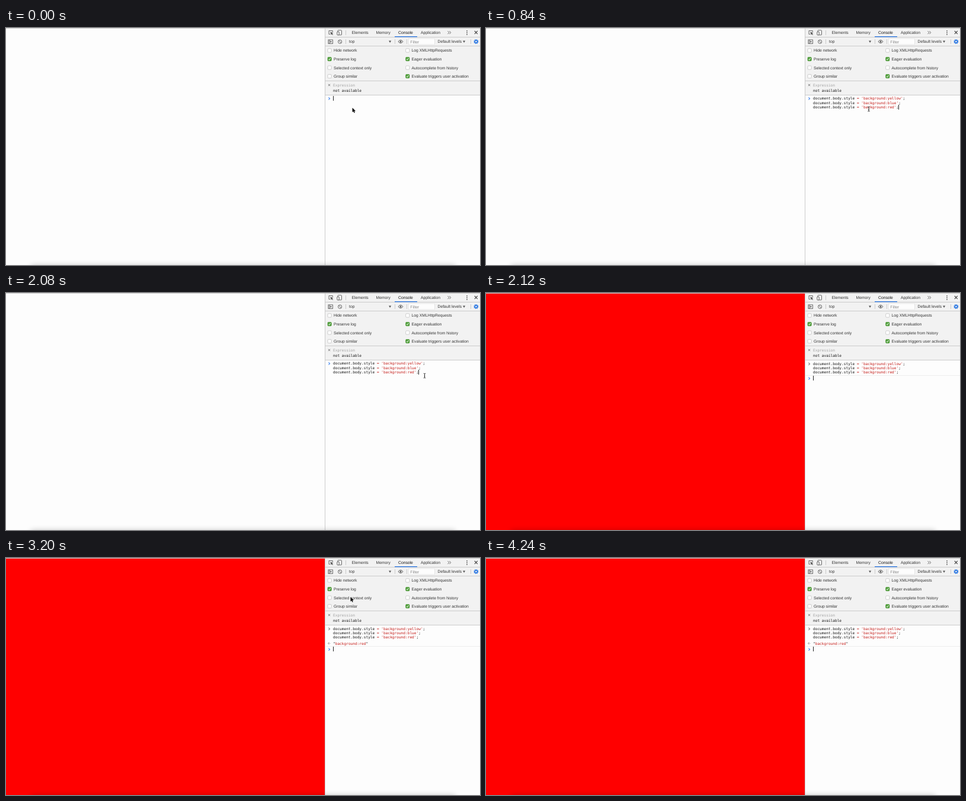
An HTML page that plays this animation: 800x401 px, repeating every 4280 ms.

```html
<!DOCTYPE html>
<html lang="en">
<head>
<meta charset="utf-8">
<title>Console batch styling</title>
<style>
  html, body { margin: 0; width: 100%; height: 100%; overflow: hidden; background: #fdfdfd; }
  svg { display: block; width: 800px; height: 401px; }
  text { font: 6.77px "Liberation Sans", Arial, sans-serif; fill: #333; text-rendering: geometricPrecision; white-space: pre; }
  .mono { font: 6.15px "DejaVu Sans Mono", Menlo, monospace; fill: #111; }
  .str { fill: #c41a16; }
  .dim { fill: #a2a2a2; }
  .rule { fill: #cbcbcb; }
  .icon { fill: none; stroke: #5a5a5a; stroke-width: .9; }
  .solid { fill: #5a5a5a; }
  .chev { fill: none; stroke-width: 1.1; }
</style>
</head>
<body>
<svg viewBox="0 0 800 401" xmlns="http://www.w3.org/2000/svg">
  <defs>
    <filter id="soft" x="-10%" y="-100%" width="120%" height="300%">
      <feGaussianBlur stdDeviation="5"/>
    </filter>
  </defs>

  <rect id="page" width="538" height="401" fill="#fdfdfd"/>
  <rect x="538" width="262" height="401" fill="#fdfdfd"/>
  <rect x="538" width="262" height="113" fill="#f2f2f2"/>

  <g class="rule">
    <rect x="538" width="1" height="401"/>
    <rect x="539" y="15" width="261" height="1"/>
    <rect x="539" y="30" width="261" height="1"/>
    <rect x="539" y="89" width="261" height="1"/>
    <rect x="539" y="113" width="261" height="1"/>
    <rect x="573" y="4" width="1" height="8"/>
    <rect x="573" y="19" width="1" height="8"/>
    <rect x="656" y="19" width="1" height="8"/>
    <rect x="676" y="19" width="1" height="8"/>
    <rect x="784" y="19" width="1" height="8"/>
  </g>
  <rect x="656" y="14" width="38" height="1.3" fill="#2b78e4"/>

  <!-- tab bar -->
  <g class="icon">
    <path d="M547 10.5H545V4.6h6.3V7"/>
    <rect x="560" y="3.8" width="6.5" height="8" rx=".8"/>
    <rect x="558.8" y="6.5" width="3.4" height="5.3" rx=".5" fill="#f2f2f2"/>
    <path d="M790.8 5l5 5.2m0-5.2l-5 5.2" stroke="#444" stroke-width="1.1"/>
    <path d="M745.6 5.2l2.2 2.5-2.2 2.5m2.9-5l2.2 2.5-2.2 2.5"/>
  </g>
  <g class="solid">
    <path d="M547.4 6.6l5 2-2 .8 1.8 1.9-.9.8-1.8-1.9-.9 1.8z"/>
    <circle cx="778" cy="5" r=".9"/><circle cx="778" cy="8" r=".9"/><circle cx="778" cy="11" r=".9"/>
  </g>

  <!-- console bar -->
  <rect x="679.5" y="18" width="44" height="10" fill="#fdfdfd" stroke="#dedede" stroke-width=".7"/>
  <g class="icon">
    <rect x="544" y="20" width="7.4" height="6.4"/>
    <path d="M545.9 20v6.4"/>
    <circle cx="563.6" cy="23.2" r="3.1"/>
    <path d="M561.5 21l4.2 4.4"/>
    <path d="M661.9 23q4.1-5.2 8.2 0q-4.1 5.2-8.2 0z"/>
  </g>
  <g class="solid">
    <path d="M547.3 21.4l2.8 1.8-2.8 1.8z"/>
    <circle cx="666" cy="23" r="1.5"/>
    <path d="M646 21.4h4.2l-2.1 3.5z"/>
    <path d="M771 21.4h4.2l-2.1 3.5z"/>
  </g>
  <g fill="none" stroke="#2b78e4">
    <circle cx="793.4" cy="23" r="2.2" stroke-width="1.7"/>
    <circle cx="793.4" cy="23" r="3.4" stroke-width="1.3" stroke-dasharray="1.35 1.32"/>
  </g>

  <g id="labels"></g>

  <!-- watched expression -->
  <path class="icon" d="M543.9 94.9l3.2 3.2m0-3.2l-3.2 3.2" stroke-width=".8"/>
  <text class="mono dim" x="552" y="98.6">Expression</text>
  <text class="mono" x="552" y="108.4">not available</text>

  <!-- console -->
  <g id="code"></g>
  <path id="echo" class="chev" stroke="#858585" d="M544.4 118l2.1 2-2.1 2"/>
  <rect id="echoLine" x="539" y="139" width="261" height="1" fill="#eeeeee"/>
  <g id="result">
    <path class="chev" stroke="#a0a0a0" stroke-width=".9" d="M545.5 142.6l-1.8 1.8 1.8 1.8"/>
    <circle cx="546.6" cy="144.4" r=".6" fill="#a0a0a0"/>
    <text class="mono" x="552" y="146.6">"<tspan class="str">background:red</tspan>"</text>
    <rect x="539" y="149" width="261" height="1" fill="#eeeeee"/>
  </g>
  <path id="prompt" class="chev" stroke="#3b82f0" d="M544.4 -2l2.1 2-2.1 2"/>
  <rect id="caret" width="1" height="8" fill="#222"/>

  <rect width="800" height="1" fill="#cacaca"/>
  <rect x="42" y="401" width="716" height="20" opacity=".2" filter="url(#soft)"/>

  <path id="arrow" d="M0 0V7.7L1.8 6.1L3 8.8L4.3 8.2L3.1 5.6H5.5Z" fill="#000" stroke="#fff" stroke-width=".7" paint-order="stroke"/>
  <path id="beam" d="M-1.7 -3.9Q0 -3.9 0 -2.8Q0 -3.9 1.7 -3.9M0 -2.8V2.8M-1.7 3.9Q0 3.9 0 2.8Q0 3.9 1.7 3.9M-.9 .9H.9" fill="none" stroke="#222" stroke-width=".9"/>
</svg>

<script>
const LOOP = 4280, TICK = 40, BLINK = 520;
const PASTE = 800, RUN = 2120, DONE = 2160;
const NS = "http://www.w3.org/2000/svg";
const $ = id => document.getElementById(id);

function add(parent, tag, attrs, text = "") {
  const el = document.createElementNS(NS, tag);
  for (const key in attrs) el.setAttribute(key, attrs[key]);
  el.textContent = text;
  return parent.appendChild(el);
}

const labels = $("labels");
const label = (text, x, y, fill = "#333") =>
  add(labels, "text", { x, y, style: `fill:${fill}` }, text);

[["Elements", 583.5], ["Memory", 624.5], ["Console", 662], ["Application", 700]]
  .forEach(([text, x]) => label(text, x, 10.2, text === "Console" ? "#111" : "#333"));
label("top", 579, 25.3);
label("Filter", 682.3, 25.5, "#858585");
label("Default levels", 728.6, 25.3);

const options = [
  ["Hide network", 0, "Log XMLHttpRequests", 0],
  ["Preserve log", 1, "Eager evaluation", 1],
  ["Selected context only", 0, "Autocomplete from history", 0],
  ["Group similar", 0, "Evaluate triggers user activation", 1]
];

function option(text, on, x, y) {
  add(labels, "rect", {
    x: x - 3.1, y: y - 3.1, width: 6.2, height: 6.2, rx: 1.2,
    fill: on ? "#50a03c" : "#fefefe", stroke: on ? "#45912f" : "#bcbcbc", "stroke-width": .7
  });
  if (on) add(labels, "path", {
    d: `M${x - 1.7} ${y + .1}l1.2 1.5l2.2 -3.3`, fill: "none", stroke: "#fff", "stroke-width": 1
  });
  label(text, x + 6.8, y + 2.4);
}

options.forEach(([left, a, right, b], i) => {
  const y = 38 + i * 14.55;
  option(left, a, 546.1, y);
  option(right, b, 677.8, y);
});

["yellow", "blue", "red"].forEach((color, i) => {
  const line = add($("code"), "text", { class: "mono", x: 552, y: 121.2 + i * 7.3 });
  add(line, "tspan", {}, "document.body.style ");
  add(line, "tspan", { class: "str" }, `= 'background:${color}'`);
  add(line, "tspan", {}, ";");
});

// Pointer keys: time, x, y
const drift = [[0, 584.6, 134.9], [280, 585.5, 134.3], [560, 585.6, 134.3], [1120, 706.5, 140]];
const sweep = [[3160, 640, 104], [3200, 581.5, 66], [3240, 526, 34], [3280, 590, 17], [3320, 740, 19], [3360, 800, 22]];

function at(keys, t) {
  const last = keys[keys.length - 1];
  if (t >= last[0]) return last.slice(1);
  const i = keys.findIndex(key => key[0] > t) - 1;
  const [t0, x0, y0] = keys[i], [t1, x1, y1] = keys[i + 1];
  const p = (t - t0) / (t1 - t0);
  const k = keys === drift ? p * p * (3 - 2 * p) : p;
  return [x0 + (x1 - x0) * k, y0 + (y1 - y0) * k];
}

const show = (id, on) => $(id).setAttribute("visibility", on ? "visible" : "hidden");
const move = (id, x, y) => $(id).setAttribute("transform", `translate(${x} ${y})`);

function draw(time) {
  const t = Math.floor(time % LOOP / TICK) * TICK;
  const pasted = t >= PASTE, ran = t >= RUN, done = t >= DONE;

  $("page").setAttribute("fill", ran ? "#ff0000" : "#fdfdfd");
  show("code", pasted);
  move("code", 0, ran ? .7 : 0);
  show("echo", ran);
  show("echoLine", ran && !done);
  show("result", done);
  move("prompt", 0, done ? 154.7 : ran ? 144.6 : 119.4);

  const typing = pasted && !ran;
  move("caret", typing ? 696 : 552, done ? 150 : ran ? 140 : typing ? 130 : 115);
  const since = done ? t - DONE : ran ? 0 : pasted ? t - PASTE : t - TICK;
  show("caret", since < 0 || Math.floor(since / BLINK) % 2 === 0);

  const sweeping = t >= 3160 && t < 3360;
  show("arrow", !pasted || sweeping);
  show("beam", typing);
  const [x, y] = at(sweeping ? sweep : drift, t);
  move("arrow", x, y);
  move("beam", x, y);
}

const start = performance.now();
function loop() {
  draw(performance.now() - start);
  requestAnimationFrame(loop);
}
draw(0);
requestAnimationFrame(loop);
</script>
</body>
</html>
```
